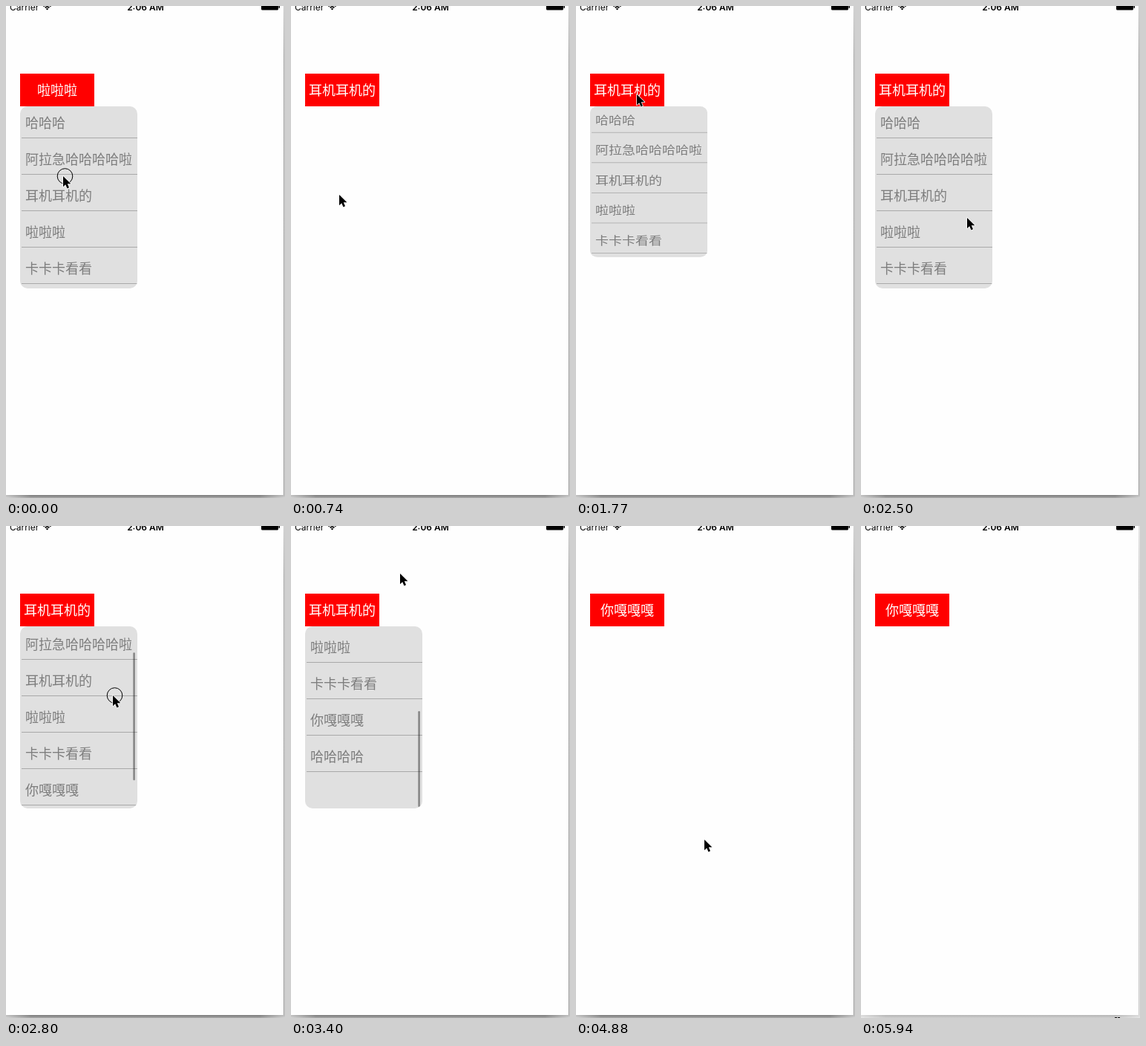
Write an HTML page that moves like this. It is 376 px wide and 662 px high and loops after 5.98 s.

```html
<!DOCTYPE html>
<html lang="zh-CN">
<head>
<meta charset="utf-8">
<title>Dropdown menu</title>
<style>
  html, body { margin: 0; width: 100%; height: 100%; overflow: hidden; background: #fefefe; }
  svg { display: block; width: 100vw; height: 100vh; }
  .cjk { font: 300 18px "Noto Sans CJK SC", "Noto Sans CJK", sans-serif; }
  .bar { font: 400 12px Inter, Roboto, sans-serif; }
  .time { font-weight: 600; text-anchor: middle; }
</style>
</head>
<body>
<svg viewBox="0 0 376 662">
  <defs>
    <clipPath id="panel"><rect x="19" width="158" height="245" rx="10"/></clipPath>
    <linearGradient id="under" x2="0" y2="1">
      <stop offset="0" stop-color="#777"/><stop offset="1" stop-color="#aaa"/>
    </linearGradient>
    <linearGradient id="ends">
      <stop offset="0" stop-color="#fff" stop-opacity=".5"/>
      <stop offset=".09" stop-color="#fff" stop-opacity="0"/>
      <stop offset=".91" stop-color="#fff" stop-opacity="0"/>
      <stop offset="1" stop-color="#fff" stop-opacity=".5"/>
    </linearGradient>
    <linearGradient id="side" x2="0" y2="1">
      <stop offset="0" stop-color="#ccc"/><stop offset=".1" stop-color="#a4a4a4"/>
      <stop offset="1" stop-color="#999"/>
    </linearGradient>
  </defs>

  <rect width="376" height="662" fill="#fefefe"/>
  <g id="shadow">
    <rect x="374" width="1" height="658" fill="url(#side)"/>
    <rect x="375" width="1" height="658" fill="#d4d4d4"/>
    <rect y="658" width="376" height="4" fill="url(#under)"/>
    <rect y="658" width="376" height="4" fill="url(#ends)"/>
  </g>

  <text class="bar" x="5" y="6">Carrier</text>
  <text class="bar time" x="188" y="6">2:06 AM</text>
  <g fill="none" stroke="#000" stroke-width="1.6">
    <path d="M50.5 0.6Q55.5 -4 60.5 0.6M52.6 2.4Q55.5 0 58.4 2.4"/>
    <path d="M55.5 5.6L53.7 3.7Q55.5 2.4 57.3 3.7Z" fill="#000" stroke="none"/>
  </g>
  <rect x="344" y="-4" width="23" height="9.5" rx="1.5"/>
  <rect x="367.5" y="-1" width="1.5" height="4" rx=".7"/>

  <rect x="19" y="91" width="100" height="44" fill="#f00"/>
  <text id="label" class="cjk" x="69" y="120" fill="#fff" text-anchor="middle"></text>

  <g id="menu">
    <g clip-path="url(#panel)">
      <rect x="19" width="158" height="245" fill="#e0e0e0"/>
      <g id="rows"></g>
      <rect id="thumb" x="171.3" width="2.6" rx="1.3" fill="#000" fill-opacity=".4"/>
    </g>
  </g>

  <g id="pointer">
    <circle id="ring" cx="2.5" r="10.3" fill="none" stroke="#000"/>
    <path d="M0 0V14.2L3.2 11.2L5.5 16.4L8 15.3L5.8 10.3H10.4Z" stroke="#fff" stroke-width="1.6" stroke-linejoin="round" paint-order="stroke"/>
  </g>
  <path id="tip" d="M342 661h3v1h-3zM346 661h3v1h-3z"/>
</svg>

<script>
const LOOP = 5980, ROW = 49, VIEW = 245, LIST_TOP = 135;
const ITEMS = ["哈哈哈", "阿拉急哈哈哈哈啦", "耳机耳机的", "啦啦啦", "卡卡卡看看", "你嘎嘎嘎", "哈哈哈哈"];
const CONTENT = ITEMS.length * ROW, MAX = CONTENT - VIEW;
const DRAG_FROM = 285, RELEASE = 3325, BLUR = 5940;

// Screen refreshes: [index, ms], evenly spaced in between
const REFRESH = [[0, 0], [8, 1180], [9, 1330], [16, 2350], [21, 3100], [29, 4300], [30, 4440], [37, 5470]];
// Pointer stops: [ms, x, y]
const PATH = [
  [0, 77, 229], [200, 77, 229], [740, 65, 254], [900, 66, 250], [1400, 80, 113], [1620, 80, 113],
  [1770, 82, 119], [1920, 90, 142], [2350, 142, 282], [2500, 143, 285], [2650, 143, 285],
  [3100, 147, 64], [3400, 147, 64], [4150, 73, 284], [4300, 70, 295], [4440, 70, 294],
  [4590, 72, 297], [5300, 350, 640], [5470, 345, 670]
];
const PRESSES = [[0, 140], [1480, 1700], [2650, 3390], [4440, 4580]];

const $ = id => document.getElementById(id);
const clamp = v => Math.max(0, Math.min(1, v));
const smooth = p => p * p * (3 - 2 * p);
const show = (id, on) => $(id).setAttribute("visibility", on ? "visible" : "hidden");

const ticks = [0];
for (let i = 1; i < REFRESH.length; i++) {
  const [a, from] = REFRESH[i - 1], [b, to] = REFRESH[i];
  for (let k = a + 1; k <= b; k++) ticks.push(Math.round((from + (to - from) * (k - a) / (b - a)) / 10) * 10);
}
ticks.push(BLUR);

$("rows").innerHTML = ITEMS.map((text, i) =>
  `<text class="cjk" x="26" y="${28.5 + i * ROW}" fill="#7d7d7d">${text}</text>` +
  `<rect x="21" y="${42 + i * ROW}" width="156" height="1" fill="#a9a9a9"/>`).join("");

function pointerAt(t) {
  const i = PATH.findIndex(p => p[0] > t);
  if (i < 0) return PATH[PATH.length - 1].slice(1);
  const [t0, x0, y0] = PATH[i - 1], [t1, x1, y1] = PATH[i];
  const p = smooth((t - t0) / (t1 - t0));
  return [x0 + (x1 - x0) * p, y0 + (y1 - y0) * p];
}

function scrollAt(t) {
  if (t < 2650) return 0;
  const pulled = Math.max(0, DRAG_FROM - 10 - pointerAt(Math.min(t, 3100))[1]);
  if (pulled <= MAX) return pulled;
  const over = VIEW * (1 - 1 / ((pulled - MAX) * 0.55 / VIEW + 1));
  const s = Math.max(0, (t - RELEASE) / 120);
  return MAX + over * (1 + s) * Math.exp(-s);
}

function openAt(t) {
  if (t < 150) return 1;
  if (t < 1588 || t >= 4440) return 0;
  return (1 - Math.cos(Math.PI * clamp((t - 1588) / 250))) / 2;
}

function drawThumb(t, scroll) {
  const full = (VIEW - 4) * VIEW / CONTENT;
  const height = full - Math.max(0, scroll - MAX);
  const y = scroll > MAX ? VIEW - 2 - height : 2 + scroll / MAX * (VIEW - 4 - full);
  $("thumb").setAttribute("y", y);
  $("thumb").setAttribute("height", height);
  $("thumb").setAttribute("opacity", scroll > 0 ? clamp((4150 - t) / 300) : 0);
}

function draw(t) {
  const [x, y] = pointerAt(t), open = openAt(t), scroll = scrollAt(t);
  $("label").textContent = ITEMS[t < 150 ? 3 : t < 4440 ? 2 : 5];
  show("menu", open > 0);
  $("menu").setAttribute("transform", `translate(0 ${LIST_TOP}) scale(1 ${open})`);
  $("rows").setAttribute("transform", `translate(0 ${-Math.round(scroll)})`);
  drawThumb(t, scroll);
  $("pointer").setAttribute("transform", `translate(${Math.round(x)} ${Math.round(y)})`);
  show("ring", PRESSES.some(([from, to]) => t >= from && t < to));
  $("shadow").setAttribute("opacity", t < BLUR ? 1 : 0.55);
  show("tip", t >= BLUR);
}

const start = performance.now();
function frame() {
  const t = (performance.now() - start) % LOOP;
  draw(ticks.filter(v => v <= t).pop());
  requestAnimationFrame(frame);
}
frame();
</script>
</body>
</html>
```
